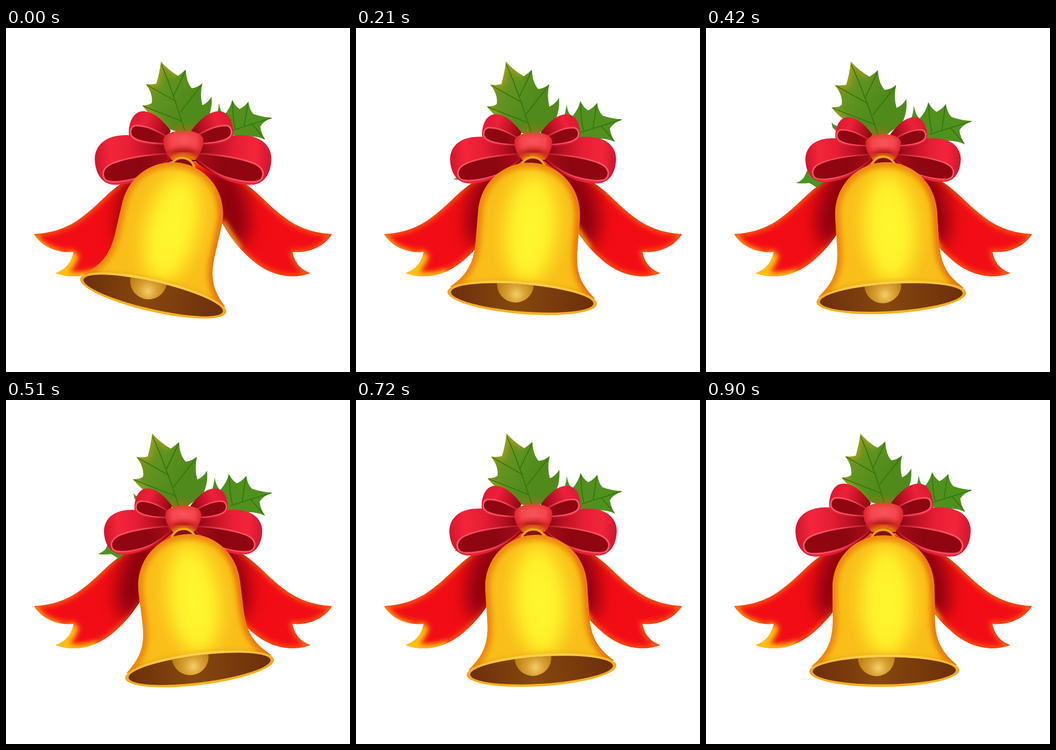
Animation, 748 px wide and 748 px high, one loop 0.93 s. Source, as an HTML page:

```html
<!DOCTYPE html>
<html lang="en">
<head>
<meta charset="utf-8">
<title>Ringing bell</title>
<style>
html, body { margin: 0; width: 100%; height: 100%; overflow: hidden; background: #fff; }
svg { display: block; width: 100vw; height: 100vh; }
.vein { fill: none; stroke: #34760f; stroke-width: 2; stroke-linecap: round; }
.hole { fill: url(#holeRed); stroke: url(#hemPink); stroke-width: 3.5; stroke-linejoin: round; }
</style>
</head>
<body>
<svg viewBox="0 0 748 748">
  <defs>
    <filter id="soft" x="-50%" y="-50%" width="200%" height="200%"><feGaussianBlur stdDeviation="6"/></filter>
    <filter id="wide" x="-80%" y="-80%" width="260%" height="260%"><feGaussianBlur stdDeviation="18"/></filter>

    <linearGradient id="loopRed" gradientUnits="userSpaceOnUse" x1="193" y1="275" x2="352" y2="258">
      <stop offset="0" stop-color="#d2162e"/><stop offset=".22" stop-color="#f4253b"/>
      <stop offset=".5" stop-color="#e51d34"/><stop offset=".78" stop-color="#b71022"/><stop offset="1" stop-color="#84080f"/>
    </linearGradient>
    <linearGradient id="smallRed" gradientUnits="userSpaceOnUse" x1="267" y1="205" x2="352" y2="240">
      <stop offset="0" stop-color="#de1832"/><stop offset=".35" stop-color="#ec2139"/>
      <stop offset=".7" stop-color="#bd1024"/><stop offset="1" stop-color="#8c0812"/>
    </linearGradient>
    <linearGradient id="holeRed">
      <stop offset="0" stop-color="#920610"/><stop offset=".6" stop-color="#8c0610"/><stop offset="1" stop-color="#a50c18"/>
    </linearGradient>
    <linearGradient id="hemPink">
      <stop offset="0" stop-color="#fa596c"/><stop offset=".6" stop-color="#ee4458"/><stop offset="1" stop-color="#b01422"/>
    </linearGradient>
    <radialGradient id="knotRed" gradientUnits="userSpaceOnUse" cx="386" cy="245" r="46">
      <stop offset="0" stop-color="#f9535b"/><stop offset=".6" stop-color="#f5454f"/><stop offset="1" stop-color="#d81f2a"/>
    </radialGradient>
    <linearGradient id="leafGreen" gradientUnits="userSpaceOnUse" x1="312" y1="110" x2="400" y2="160">
      <stop offset="0" stop-color="#86941f"/><stop offset=".4" stop-color="#5f9320"/><stop offset="1" stop-color="#4f8a1b"/>
    </linearGradient>
    <radialGradient id="clapperGold" gradientUnits="userSpaceOnUse" cx="372" cy="580" r="44">
      <stop offset="0" stop-color="#f2cf6c"/><stop offset=".45" stop-color="#d9a030"/><stop offset="1" stop-color="#bd7d14"/>
    </radialGradient>
    <linearGradient id="rimGold" x2="0" y2="1">
      <stop offset="0" stop-color="#ffd44a"/><stop offset=".5" stop-color="#f3a517"/><stop offset="1" stop-color="#f6b325"/>
    </linearGradient>
    <linearGradient id="insideBrown">
      <stop offset="0" stop-color="#6c2f0c"/><stop offset=".45" stop-color="#86480e"/><stop offset="1" stop-color="#6c2f0b"/>
    </linearGradient>

    <path id="ribbonShape" d="M365 288L255 335C215 362 205 382 160 415C128 438 95 446 61 448C78 476 112 490 147 487C143 508 132 524 108 533C150 549 200 538 240 500C265 478 282 455 300 424L370 400Z"/>
    <path id="bellShape" d="M385 292C330 292 274 335 274 408L274 470C274 520 262 546 226 576L544 576C508 546 496 520 496 470L496 408C496 335 440 292 385 292Z"/>
    <path id="leafShape" d="M337 73Q353 92 374 104Q383 98 391 90Q392 118 404 131Q418 129 427 120Q421 146 427 168Q440 162 447 149Q449 178 437 200L395 232L355 220L312 186Q304 178 296 168Q310 169 317 163Q320 143 304 122Q317 124 327 121Q334 98 337 73Z"/>
    <path id="knotShape" d="M342 243C345 228 370 223 386 223C402 223 428 228 429 243C430 262 420 275 412 287L360 287C350 275 341 262 342 243Z"/>

    <clipPath id="ribbonClip"><use href="#ribbonShape"/></clipPath>
    <clipPath id="bellClip"><use href="#bellShape"/></clipPath>
    <clipPath id="leafClip"><use href="#leafShape"/></clipPath>
    <clipPath id="knotClip"><use href="#knotShape"/></clipPath>
    <clipPath id="mouthClip"><ellipse cx="385" cy="586.5" rx="155.5" ry="29.5"/></clipPath>

    <g id="ribbon" clip-path="url(#ribbonClip)">
      <use href="#ribbonShape" fill="#f20d16"/>
      <use href="#ribbonShape" fill="none" stroke="#ff6a0a" stroke-width="9" filter="url(#soft)"/>
      <ellipse cx="285" cy="380" rx="38" ry="96" transform="rotate(16 285 380)" fill="#850408" opacity=".92" filter="url(#wide)"/>
    </g>
    <g id="bigLoop">
      <path fill="url(#loopRed)" d="M352 262C320 238 280 230 245 234C208 239 193 262 193 285C194 318 210 341 238 341C285 341 325 318 358 290Z"/>
      <path class="hole" d="M350 273C300 276 255 284 230 295C208 305 208 320 216 330C226 339 265 333 290 325C318 316 340 298 354 286Z"/>
    </g>
    <g id="smallLoop">
      <path fill="url(#smallRed)" d="M358 223C343 203 322 181 298 181C275 181 266 210 267 230C269 246 295 252 346 262Z"/>
      <path class="hole" d="M354 239C325 220 300 212 283 212C270 213 268 228 274 236C285 247 315 251 346 252Z"/>
    </g>
  </defs>

  <use href="#ribbon"/>
  <g clip-path="url(#ribbonClip)">
    <path d="M61 452Q80 484 118 490" fill="none" stroke="#ffa514" stroke-width="12" filter="url(#soft)"/>
    <path d="M147 490Q140 522 108 535Q150 552 200 536" fill="none" stroke="#ffc010" stroke-width="24" filter="url(#soft)"/>
  </g>
  <g transform="matrix(-1 0 0 1 770 0)">
    <use href="#ribbon"/>
    <g clip-path="url(#ribbonClip)">
      <path d="M300 420L262 480" stroke="#ffb01c" stroke-width="10" filter="url(#soft)"/>
    </g>
  </g>

  <g id="sideLeaf">
    <path fill="#4a9420" d="M227 321Q239 316 244 309L252 292L293 314L271 331Q262 324 255 321Q240 323 227 321Z"/>
    <path fill="#4a9420" d="M304 189Q309 196 315 196L318 212L306 200Z"/>
  </g>
  <g id="rightLeaf">
    <path fill="#50901d" d="M463 163Q466 182 474 190Q488 174 492 156Q498 170 508 176Q519 171 527 160Q529 178 538 187Q558 194 579 195Q560 202 553 214Q555 231 564 243Q545 234 525 236L470 230L455 195Q462 180 463 163Z"/>
    <path class="vein" d="M576 196L494 222M526 164L518 212M493 162Q492 190 498 218M561 240L536 210"/>
  </g>
  <g id="mainLeaf">
    <use href="#leafShape" fill="url(#leafGreen)"/>
    <g clip-path="url(#leafClip)">
      <path d="M302 120L328 121L337 73L370 104M296 168L350 220" fill="none" stroke="#b0a51c" stroke-width="8" filter="url(#soft)"/>
      <ellipse cx="388" cy="222" rx="30" ry="12" fill="#7c7d16" filter="url(#soft)"/>
    </g>
    <path class="vein" d="M338 80Q360 130 389 225M390 94L365 146M425 124L379 183M307 124L370 160M299 170L383 203"/>
  </g>

  <g id="bow">
    <path fill="#8a0810" d="M340 245L430 245L436 290L334 290Z"/>
    <use href="#bigLoop"/>
    <use href="#bigLoop" transform="matrix(-1 0 0 1 770 0)"/>
    <use href="#smallLoop"/>
    <use href="#smallLoop" transform="matrix(-1 0 0 1 761 0)"/>
    <use href="#knotShape" fill="url(#knotRed)"/>
    <g clip-path="url(#knotClip)">
      <path d="M345 231Q386 214 427 231" fill="none" stroke="#e2401c" stroke-width="10" filter="url(#soft)"/>
      <ellipse cx="386" cy="275" rx="30" ry="14" fill="#b01410" filter="url(#soft)"/>
      <path d="M357 290Q386 264 415 290" fill="none" stroke="#ff9a12" stroke-width="10" filter="url(#soft)"/>
    </g>
  </g>

  <g id="bell">
    <ellipse cx="385" cy="303" rx="25.5" ry="23" fill="#85100c" stroke="#eea51c" stroke-width="5"/>
    <g clip-path="url(#bellClip)">
      <use href="#bellShape" fill="#f9be1a"/>
      <ellipse cx="391" cy="435" rx="58" ry="120" fill="#fff02a" filter="url(#wide)"/>
      <ellipse cx="391" cy="440" rx="20" ry="75" fill="#fff82e" filter="url(#wide)"/>
      <ellipse cx="385" cy="568" rx="125" ry="16" fill="#e8a81b" filter="url(#soft)"/>
      <use href="#bellShape" fill="none" stroke="#ec860a" stroke-width="21" filter="url(#soft)"/>
      <path d="M470 330Q497 370 497 450C497 520 510 548 544 576" fill="none" stroke="#ec6d0c" stroke-width="9" filter="url(#soft)"/>
    </g>
    <ellipse cx="385" cy="586.5" rx="163" ry="35" fill="url(#rimGold)"/>
    <g clip-path="url(#mouthClip)">
      <ellipse cx="385" cy="586.5" rx="156" ry="30" fill="url(#insideBrown)"/>
      <circle cx="368" cy="558" r="40" fill="url(#clapperGold)"/>
    </g>
  </g>
</svg>
<script>
const LOOP = 930, STEP = 30;
const move = (id, transform) => document.getElementById(id).setAttribute('transform', transform);
// Matrix that blends from identity (k = 0) to identity plus the given change (k = 1)
const blend = (k, a, b, c, d, e, f) =>
  `matrix(${1 + a * k} ${b * k} ${c * k} ${1 + d * k} ${e * k} ${f * k})`;

function draw(now) {
  const t = Math.floor(now % LOOP / STEP) * STEP;
  const squeeze = Math.min(t / 420, (LOOP - t) * 0.002065);
  const angle = Math.max(13 - 0.0395 * t, -0.0175 * (LOOP - t));

  move('bow', `translate(385 289) scale(${1 - 0.12 * squeeze}) translate(-385 -289)`);
  move('mainLeaf', blend(squeeze, 0.083, 0.012, 0.02, 0.05, -51.4, -7.7));
  move('rightLeaf', blend(squeeze, 0.09, 0, 0.02, 0.06, -56, -4.4));
  move('sideLeaf', `translate(${-31 * squeeze} ${16 * squeeze})`);
  move('bell', `translate(0 ${2.5 * (1 - squeeze)}) rotate(${angle} 385 298)`);
  requestAnimationFrame(draw);
}
draw(0);
</script>
</body>
</html>
```
